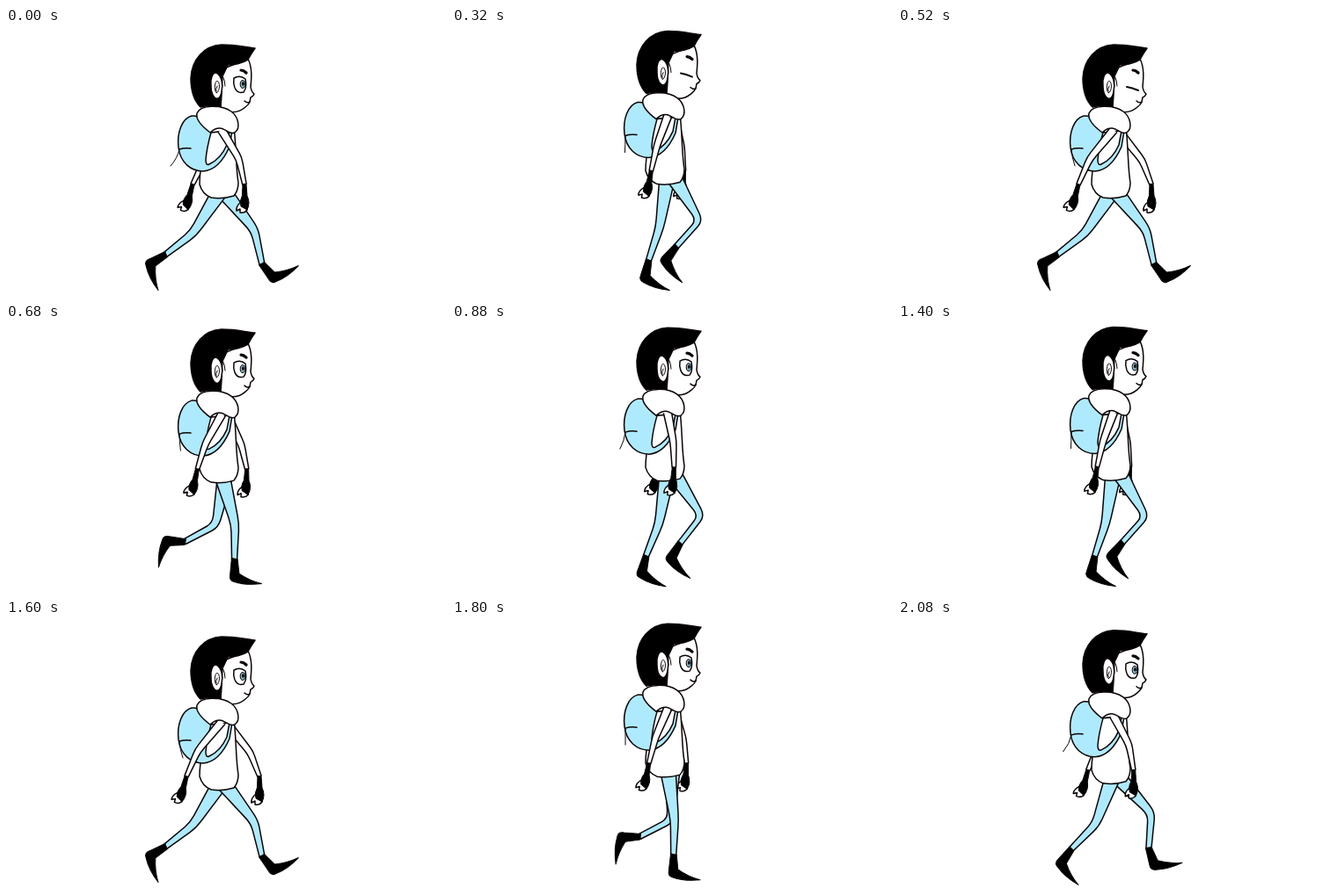
An HTML page for the animation above (2.12 s loop, 500 by 305 pixels).

```html
<!DOCTYPE html>
<html lang="en">
<head>
<meta charset="utf-8">
<title>Walk cycle</title>
<style>
html, body { margin: 0; width: 100%; height: 100%; overflow: hidden; background: #fff; }
svg { display: block; width: 100vw; height: 100vh; }
.line { fill: none; stroke: #0c0405; stroke-width: 1.5; stroke-linecap: round; stroke-linejoin: round; }
.white { fill: #fff; }
.blue { fill: #aeeafe; }
.ink { fill: #000; }
.thin { stroke-width: 1; }
</style>
</head>
<body>
<svg viewBox="0 0 500 305">
  <g class="line">
    <g id="farArm"></g>
    <g id="farLeg"></g>
    <g id="nearLeg"></g>
    <g class="upper">
      <path class="white" d="M236 112C226 135 220 158 220 178Q223 189 233 193Q246 195 259 191Q264 185 264 176C261 158 262 140 259 112Z"/>
      <path class="blue" d="M233 119C227 106 219 99 211 100C200 103 194 119 196 136C198 153 210 163 224 163C237 162 247 151 254 135L257 117Z"/>
      <path class="white" d="M233 119Q228 137 227 150Q227 157 231 155C240 151 247 142 251 133L254 117Z"/>
      <path d="M197 138Q203 136 210 137"/>
      <path id="cord" class="thin"/>
    </g>
    <g id="nearArm"></g>
    <g class="upper">
      <path class="white" d="M275 35C280 45 279 57 278 67Q279 73 282 75Q281 78 278 79L277 84Q276 87 272 90C263 98 252 97 240 91L238 50Z"/>
      <path class="ink" d="M283 23C271 22 263 19 245 19C225 20 211 36 210 57C210 73 215 84 221 90Q233 87 244 90L245 76L246 55Q250 47 252 42Q265 42 275 36Q278 30 283 23Z"/>
      <path class="white" d="M233 66C232 57 235 50 239 51C245 54 247 64 245 72C244 80 240 82 237 79Q233 75 233 66Z"/>
      <path class="thin" d="M238 72C236 65 239 58 241 61C244 65 242 73 239 74Q238 69 240 66M246 54Q249 60 249 66"/>
      <path d="M267 48Q270 48 273 51" stroke-width="3.2"/>
      <path d="M271 83Q274 86 277 84"/>
      <g id="eyeOpen">
        <path class="white" d="M259 57Q266 53 272 58Q274 68 270 73Q263 75 260 68Q258 63 259 57Z"/>
        <ellipse class="thin" cx="269" cy="64" rx="2.8" ry="4.4" fill="#74b5c8"/>
        <ellipse class="ink" cx="269.4" cy="63.5" rx="1.3" ry="2.2" stroke="none"/>
      </g>
      <path id="eyeShut" d="M260 67Q266 68 273 71" stroke-width="2"/>
      <path class="white" d="M232 119C224 113 215 105 217 97C221 87 245 87 256 95C264 101 267 114 260 119C254 122 249 114 243 114Q237 114 232 119Z"/>
    </g>
  </g>
</svg>
<script>
const LOOP = 2120, CYCLE = 1080, HALF = 520, STEP = 40;
const THIGH = 60, SHIN = 40;
const SHOE = "M-3.4 -1L-2 18Q-2 25 4 25Q18 27 35 22Q21 21 8 15L3.4 -1Z";
const GLOVE = "M-2 0L-2.6 13Q-6 19 -4 25L3 29Q7 21 3 13L2 0Z";
const FINGERS = "M-4 20Q-10 25 -9 30L-5 28L-5 32Q0 33 3 29L3 24Z";

const el = id => document.getElementById(id);
const lerp = (a, b, k) => a + (b - a) * k;
const mix = (a, b, k) => [lerp(a[0], b[0], k), lerp(a[1], b[1], k)];
const shift = (p, v, k) => [p[0] + v[0] * k, p[1] + v[1] * k];
const pt = p => p[0].toFixed(2) + " " + p[1].toFixed(2);
const arch = u => Math.sin(Math.PI * u);
const smooth = u => u * u * (3 - 2 * u);
const shape = (cls, d) => `<path class="${cls}" d="${d}"/>`;
const placed = (p, angle, body) => `<g transform="translate(${pt(p)}) rotate(${angle})">${body}</g>`;

// Unit vector towards the front of a segment that runs from a down to b
function front(a, b) {
  const x = b[0] - a[0], y = b[1] - a[1], length = Math.hypot(x, y);
  return [y / length, -x / length];
}

// Tapered limb with one rounded joint
function limb(a, b, c, widths) {
  const n1 = front(a, b), n2 = front(b, c), nb = mix(n1, n2, .5);
  const side = k => [shift(a, n1, k * widths[0]), shift(b, nb, k * widths[1]), shift(c, n2, k * widths[2])];
  const [f, g, h] = side(1), [p, q, r] = side(-1);
  return `M${pt(f)}L${pt(mix(g, f, .15))}Q${pt(g)} ${pt(mix(g, h, .2))}L${pt(h)}` +
    `L${pt(r)}L${pt(mix(q, r, .2))}Q${pt(q)} ${pt(mix(q, p, .15))}L${pt(p)}`;
}

// Knee that joins hip and ankle, bending forwards
function kneeOf(hip, ankle) {
  const d = Math.hypot(ankle[0] - hip[0], ankle[1] - hip[1]);
  if (d >= THIGH + SHIN) return mix(hip, ankle, THIGH / (THIGH + SHIN));
  const along = (THIGH ** 2 - SHIN ** 2 + d * d) / (2 * d);
  const bend = Math.sqrt(THIGH ** 2 - along ** 2);
  return shift(mix(hip, ankle, along / d), front(hip, ankle), bend);
}

// u runs from one heel strike to the next
function leg(u, planted, bob) {
  const hip = [245 + (planted ? 0 : 6 * arch(u)), 183 + bob];
  const ankle = planted
    ? [lerp(291, 181, u), 269 - 11 * u * u]
    : [lerp(181, 291, smooth(u)), lerp(258, 269, u) - 17 * arch(u)];
  const pitch = planted
    ? -30 + 38 * Math.min(1, 4 * u) + 61 * u ** 3
    : lerp(69, -30, u) + 112 * (1 - u) * arch(u);
  return shape("blue", limb(hip, kneeOf(hip, ankle), ankle, [9, 4.6, 3])) +
    placed(ankle, pitch, shape("ink thin", SHOE));
}

// swing is 1 with the arm fully forward, -1 fully back
function arm(shoulder, middle, reach, swing, bob) {
  const wrist = [middle + reach * swing, 178 + bob];
  const elbow = shift(mix(shoulder, wrist, .53), [swing, 0], 6);
  return shape("white", limb(shoulder, elbow, wrist, [4.6, 3.6, 2.2])) +
    placed(wrist, 8 - 8 * swing, shape("white", FINGERS) + shape("ink thin", GLOVE));
}

function draw(time) {
  const t = time % CYCLE, nearSwings = t < HALF;
  const u = nearSwings ? t / HALF : (t - HALF) / (CYCLE - HALF);
  const bob = -16.5 * arch(u);
  const swing = Math.cos(Math.PI * u) * (nearSwings ? 1 : -1);
  const sway = -3 - 7 * swing;
  el("farLeg").innerHTML = leg(u, nearSwings, bob);
  el("nearLeg").innerHTML = leg(u, !nearSwings, bob);
  el("farArm").innerHTML = arm([253, 120 + bob], 250, 38, -swing, bob);
  el("nearArm").innerHTML = arm([245, 116 + bob], 238, 33, swing, bob);
  el("cord").setAttribute("d", `M197 138Q${197 + sway * .2} 148 ${197 + sway} 157`);
  for (const g of document.querySelectorAll(".upper")) g.setAttribute("transform", `translate(0 ${bob})`);
  const shut = time >= 280 && time < 600;
  el("eyeOpen").style.display = shut ? "none" : "";
  el("eyeShut").style.display = shut ? "" : "none";
}

const start = performance.now();
function tick() {
  const elapsed = (performance.now() - start) % LOOP;
  draw(Math.floor(elapsed / STEP) * STEP);
  requestAnimationFrame(tick);
}
tick();
</script>
</body>
</html>
```
